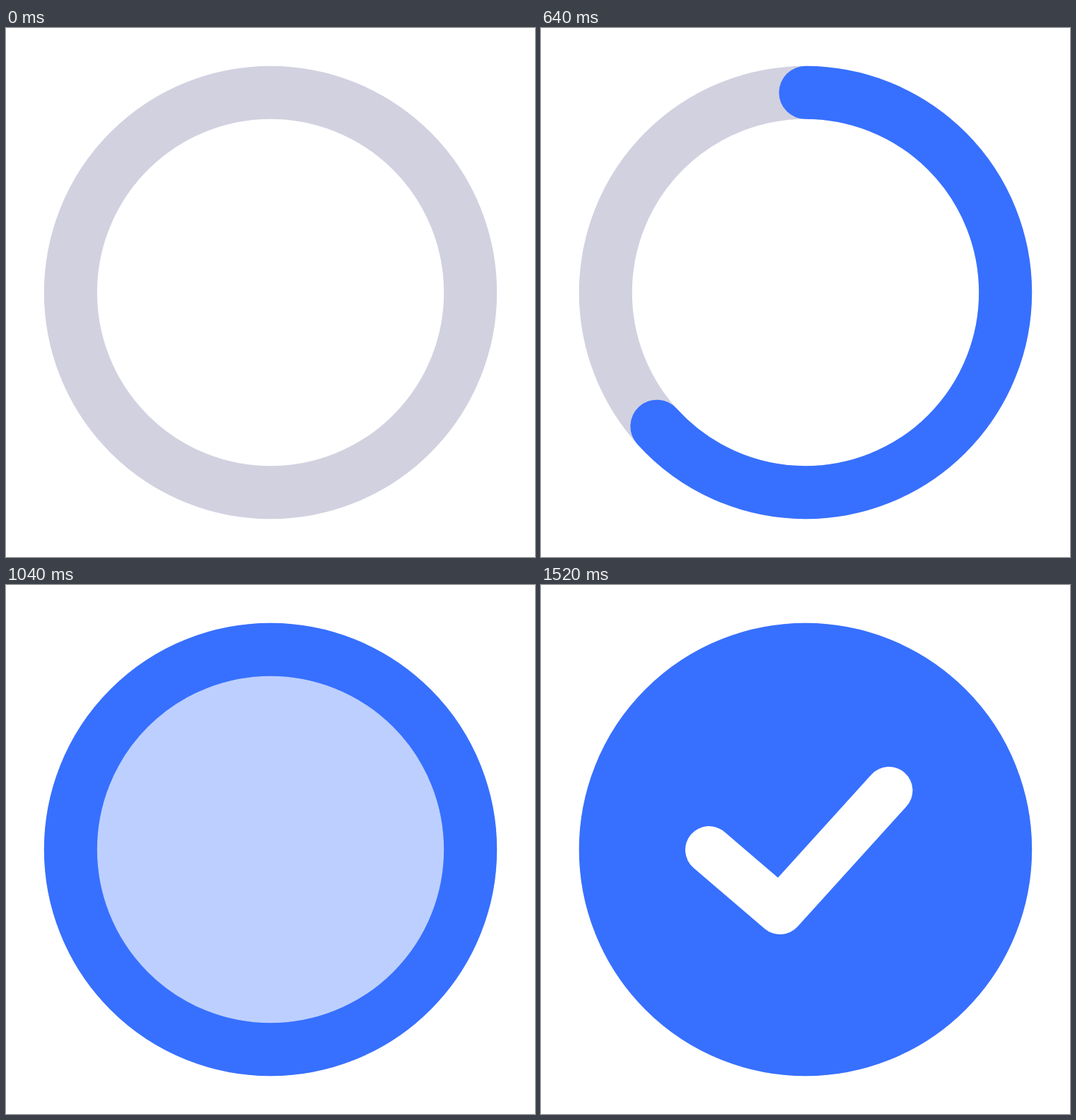
Animation, 748 px wide and 748 px high, one loop 2000 ms. Source, as an HTML page:

```html
<!DOCTYPE html>
<html lang="en">
<head>
<meta charset="utf-8">
<title>Progress ring with check mark</title>
<style>
  html, body { margin: 0; width: 100%; height: 100%; overflow: hidden; background: #fff; }
  svg { display: block; width: 100%; height: 100%; }
</style>
</head>
<body>
<svg viewBox="0 0 748 748" fill="none" stroke-linecap="round" stroke-linejoin="round">
  <circle cx="374" cy="374" r="282.7" stroke="#d2d1e0" stroke-width="75"/>
  <circle id="disc" cx="374" cy="374" r="283" fill="#3770ff"/>
  <circle id="ring" cx="374" cy="374" r="282.7" pathLength="360" stroke="#3770ff" stroke-width="75" transform="rotate(-90 374 374)"/>
  <path id="check" d="M237.5 374.5 338 460.5 492 290.5" pathLength="100" stroke="#fff" stroke-width="67"/>
</svg>
<script>
const LOOP = 2000, STEP = 80, FPS = 30;
const [disc, ring, check] = ['disc', 'ring', 'check'].map(id => document.getElementById(id));

// Linear progress from a to b, clamped to 0..1
const span = (x, a, b) => Math.min(1, Math.max(0, (x - a) / (b - a)));

function trim(el, part, length) {
  el.style.display = part > 0 ? '' : 'none';
  el.setAttribute('stroke-dasharray', `${part * length} ${length * 2}`);
}

function draw(ms) {
  // The picture is held for STEP ms and sits on a 30 fps timeline
  const held = Math.floor(ms % LOOP / STEP) * STEP;
  const tick = Math.round(held * FPS / 1000);
  trim(ring, span(tick, 0, 30), 360);
  disc.setAttribute('opacity', span(tick, 30, 33));
  trim(check, span(tick, 33, 45), 100);
}

const start = performance.now();
function loop() {
  draw(performance.now() - start);
  requestAnimationFrame(loop);
}
loop();
</script>
</body>
</html>
```
